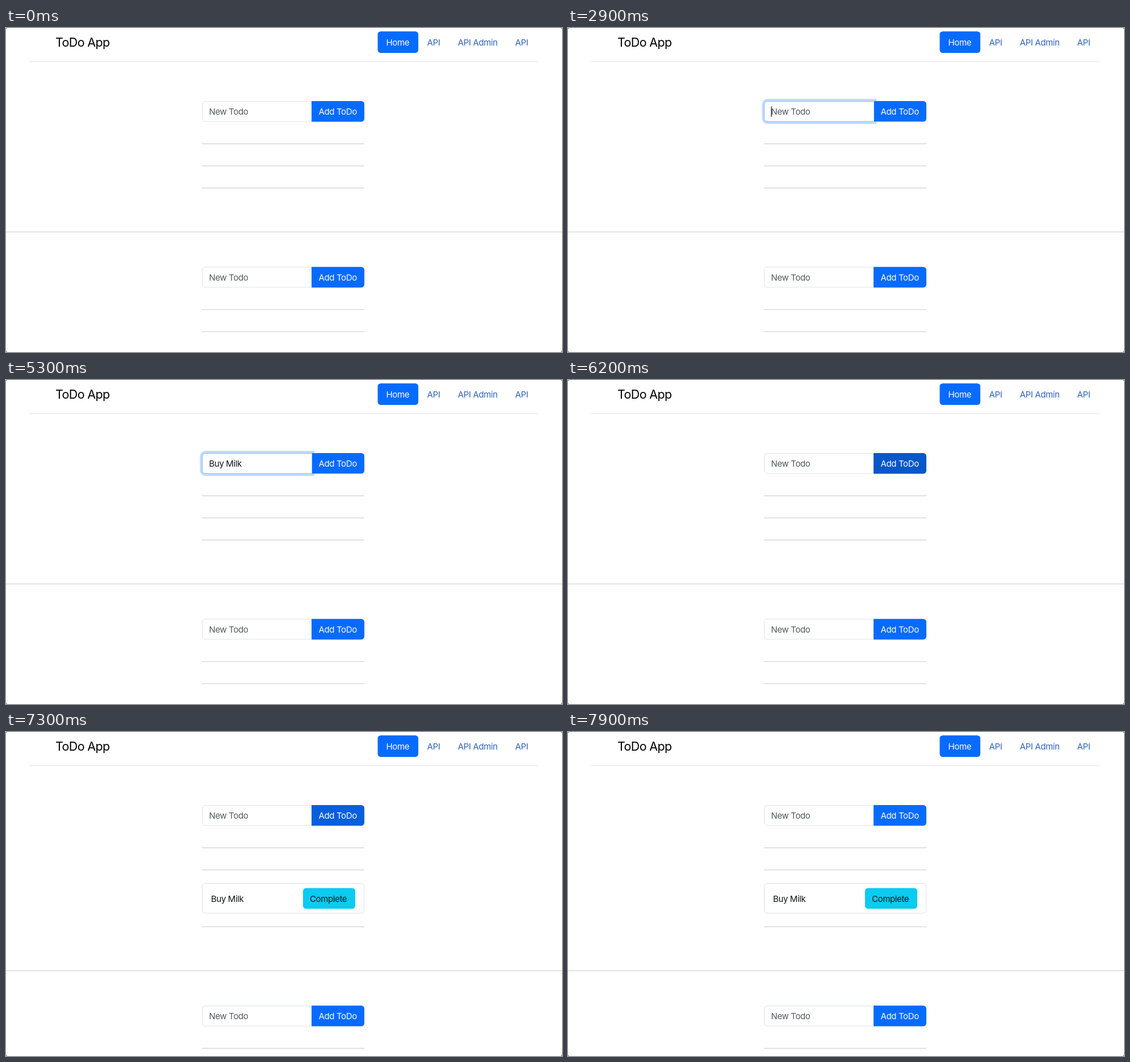
An HTML page for the animation above (8 s loop, 979 px wide and 572 px high).

```html
<!DOCTYPE html>
<html lang="en">
<head>
<meta charset="utf-8">
<title>ToDo App</title>
<style>
html, body { margin: 0; width: 100%; height: 100%; overflow: hidden; background: #fff; }
svg { display: block; width: 979px; height: 572px; }
text { font: 15px Inter, Roboto, sans-serif; letter-spacing: -.025em; fill: #111418; white-space: pre; }
.brand { font-size: 21.5px; letter-spacing: -.03em; fill: #000; }
.link { fill: #2c62c6; }
.white { fill: #fff; }
.hint { fill: #54595e; }
.blue { fill: #086bff; }
.field { fill: #fff; stroke: #dee2e6; }
.rule { fill: #c7c8c9; }
</style>
</head>
<body>
<svg viewBox="0 0 979 572">
  <defs>
    <g id="button">
      <path d="M538 129h87.500a5.500 5.500 0 0 1 5.500 5.500v25.500a5.500 5.500 0 0 1-5.500 5.500h-87.500z"/>
      <text class="white" x="550.500" y="153">Add ToDo</text>
    </g>
    <path id="field" d="M539 129.500h-188a5.500 5.500 0 0 0-5.500 5.500v24.500a5.500 5.500 0 0 0 5.500 5.500h188z"/>
    <rect id="rule" class="rule" x="345" width="286" height="1"/>
  </defs>

  <text class="brand" x="87" y="33">ToDo App</text>
  <rect class="blue" x="654.500" y="6" width="71.500" height="38" rx="5.500"/>
  <text class="white" x="669.500" y="31">Home</text>
  <text class="link" x="741.500" y="31">API</text>
  <text class="link" x="795.500" y="31">API Admin</text>
  <text class="link" x="896.500" y="31">API</text>
  <rect x="41" y="59" width="895" height="1" fill="#e0e2e4"/>

  <use href="#field" class="field"/>
  <g id="ring">
    <path d="M543 125h-192a10 10 0 0 0-9.500 9.500v25.500a10 10 0 0 0 9.500 9.500h192z" fill="#c2dbfe"/>
    <use href="#field" fill="#fff" stroke="#86b7fe"/>
  </g>
  <text id="hint" class="hint" x="357.500" y="153">New Todo</text>
  <text id="typed" x="357.500" y="153"></text>
  <rect id="caret" y="138.500" width="1.200" height="18.500" fill="#111"/>
  <use id="add" href="#button"/>

  <use href="#rule" y="204"/>
  <use href="#rule" y="243"/>
  <g id="item">
    <rect x="345.500" y="267.500" width="285" height="52.500" rx="5.500" fill="#fff" stroke="#dfe0e1"/>
    <text x="361" y="299.500">Buy Milk</text>
    <rect x="523" y="275.500" width="92" height="36.500" rx="5.500" fill="#0dcaf0"/>
    <text x="535" y="299.500" fill="#000">Complete</text>
  </g>
  <g id="below">
    <use href="#rule" y="282"/>
    <rect class="rule" y="359.500" width="979" height="1"/>
    <g transform="translate(0 292.700)">
      <use href="#field" class="field"/>
      <text class="hint" x="357.500" y="153">New Todo</text>
      <use href="#button" class="blue"/>
    </g>
    <use href="#rule" y="496.500"/>
    <use href="#rule" y="535.500"/>
    <use href="#rule" y="574.500"/>
  </g>
  <path d="M0 0h2l-2 2zM979 0h-2l2 2zM0 572h2l-2-2zM979 572h-2l2-2z" fill="#777"/>
</svg>
<script>
const LOOP = 8000;
const $ = id => document.getElementById(id);

const typing = [[0, ''], [3000, 'B'], [3300, 'Bu'], [3500, 'Buy'], [3700, 'Buy '],
  [3900, 'Buy M'], [4300, 'Buy Mi'], [4500, 'Buy Mil'], [4800, 'Buy Milk'], [6200, '']];
const caretOn = [[0, 0], [1900, 1], [2400, 0], [2900, 1], [5300, 0], [5800, 1], [6100, 0]];
const buttonFill = [[0, '#086bff'], [5900, '#0963e5'], [6000, '#085fdc'], [6100, '#0757c9'],
  [6300, '#085cd6'], [7300, '#085fdc'], [7400, '#086bff']];

const at = (steps, t) => steps.findLast(s => s[0] <= t)[1];
const ramp = (t, from) => Math.min(1, Math.max(0, (t - from) / 120));
const show = (id, on) => $(id).setAttribute('visibility', on ? 'visible' : 'hidden');

function draw(t) {
  const text = at(typing, t);
  const added = t >= 6300;
  const focused = t >= 1900 && t < 6200;
  $('typed').textContent = text;
  $('caret').setAttribute('x', 357.5 + (text ? $('typed').getComputedTextLength() : 0));
  show('caret', at(caretOn, t));
  show('hint', !text);
  $('ring').setAttribute('opacity', ramp(t, 1900) - ramp(t, 6080));
  $('add').setAttribute('fill', at(buttonFill, t));
  $('add').style.clipPath = focused ? 'inset(0 0 0 1px)' : 'none';
  show('item', added);
  $('below').setAttribute('transform', `translate(0 ${added ? 61.4 : 0})`);
}

const start = performance.now();
function tick() {
  draw((performance.now() - start) % LOOP);
  requestAnimationFrame(tick);
}
draw(0);
tick();
</script>
</body>
</html>
```
